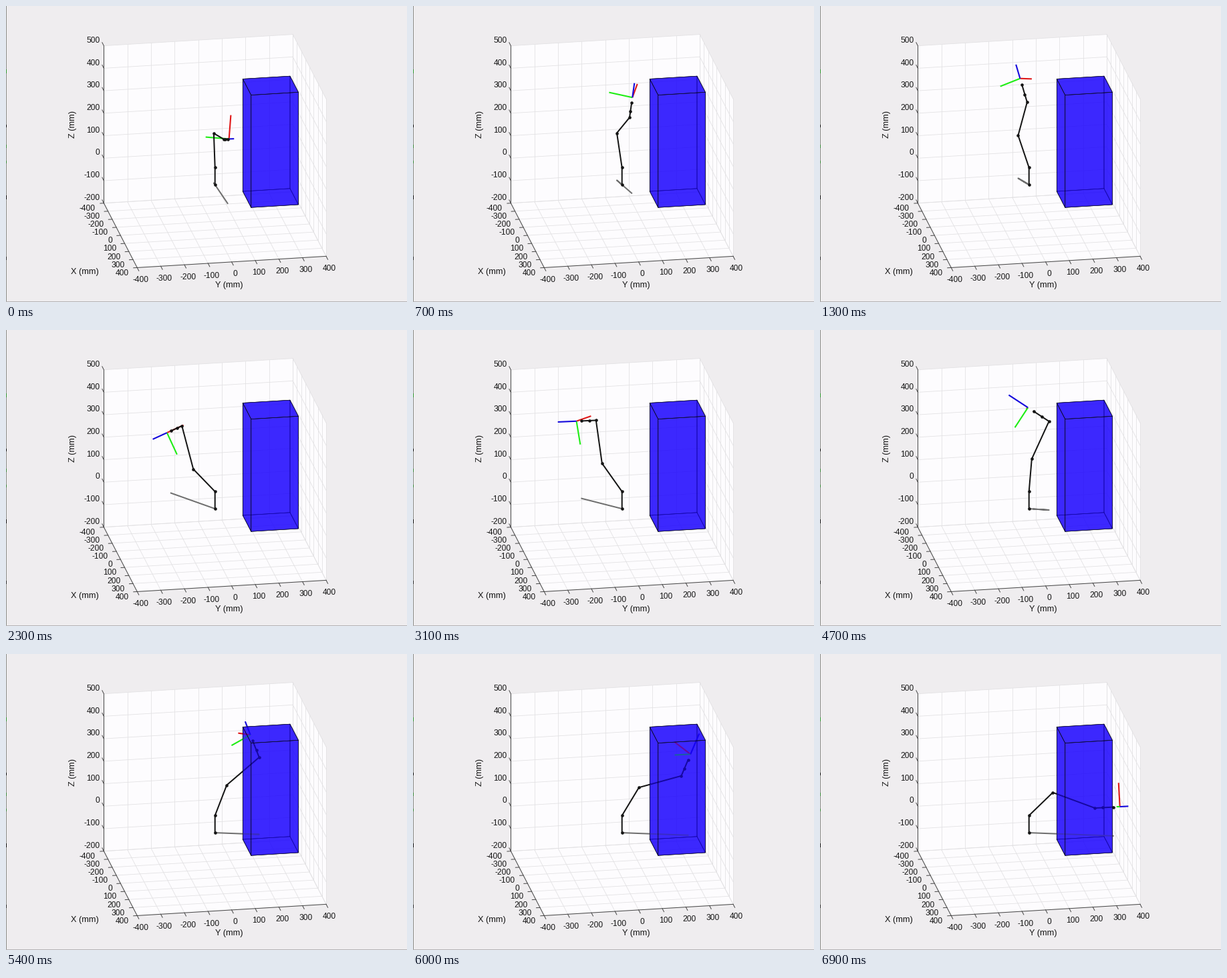
Animation, 600 px wide and 444 px high, one loop 7 s. Source, as a matplotlib script:

```python
import matplotlib.pyplot as plt
import numpy as np
from matplotlib.animation import FuncAnimation
from matplotlib.patches import Polygon, Rectangle

W, H, DPI = 600, 444, 100
FRAMES, INTERVAL = 70, 100
PX = 72 / DPI  # one pixel in points

LO = np.array([-400, -400, -200])
HI = np.array([400, 400, 500])

# orthographic view: azimuth 80, elevation 20 degrees
SCALE, ORIGIN = 0.3589, np.array([312.7, 268.1])
AZ, EL = np.radians([10, 20])
VIEW = SCALE * np.array([
    [np.sin(AZ), np.cos(AZ), 0],
    [np.cos(AZ) * np.sin(EL), -np.sin(AZ) * np.sin(EL), -np.cos(EL)],
])

# arm lengths in mm; the tool points lie along the hand
BASE, UPPER, FORE = 76.5, 146, 187.3
HAND = (34, 77)
TIP, AXIS = 105, 100

# joint angles in degrees: yaw, shoulder, elbow, wrist, roll
KEY_TIMES = [1, 23, 25.2, 49.7, 69]
KEY_POSES = np.array([
    [-177, 81.2, 86.8, -8, 171],
    [-146.2, 26.6, 41.9, -99.5, 85],
    [-146.2, 26.6, 41.9, -99.5, 85],
    [-106.3, 103, 15.5, -79, 121],
    [-106.3, 133.2, 66.2, -25, 160],
])

BACK, WALL, GRID = "#efedef", "#fdfcfe", "#e2e1e3"
INK, SHADOW, RULER, LABEL = "#141414", "#6e6e6e", "#484848", "#161616"
BOX_FACE, BOX_EDGE = (24 / 255, 0, 1, 0.6), "#08081e"
AXIS_COLORS = ("#e01818", "#1eee14", "#1408dc")

plt.rcParams["font.family"] = "Liberation Sans"
fig = plt.figure(figsize=(W / DPI, H / DPI), dpi=DPI, facecolor=BACK)
ax = fig.add_axes([0, 0, 1, 1])
ax.set_xlim(0, W)
ax.set_ylim(H, 0)
ax.axis("off")


def project(points):
    return np.atleast_2d(points) @ VIEW.T + ORIGIN


def line(points, color, width, z, **style):
    x, y = project(points).T
    return ax.plot(x, y, color=color, lw=width * PX, zorder=z, **style)[0]


def text(x, y, label, size=12, **style):
    ax.text(x, y, label, size=size * PX, color=LABEL, zorder=3, **style)


def quad(axis, value, lo, hi):
    """Corners of a rectangle lying across one axis."""
    a, b = [i for i in range(3) if i != axis]
    corners = np.full((4, 3), float(value))
    corners[:, a] = lo[a], hi[a], hi[a], lo[a]
    corners[:, b] = lo[b], lo[b], hi[b], hi[b]
    return corners


def draw_walls():
    for axis, value in ((0, LO[0]), (1, HI[1]), (2, LO[2])):
        ax.add_patch(Polygon(project(quad(axis, value, LO, HI)), fc=WALL, ec="none", zorder=0))
        a, b = [i for i in range(3) if i != axis]
        for along, across in ((a, b), (b, a)):
            for v in range(LO[across], HI[across] + 1, 100):
                ends = np.full((2, 3), float(value))
                ends[:, across] = v
                ends[:, along] = LO[along], HI[along]
                line(ends, GRID, 0.8, 1)


def draw_ruler(axis, start, tick_dir, offset, align):
    ends = np.array([start, start], float)
    ends[:, axis] = LO[axis], HI[axis]
    line(ends, RULER, 1, 2)
    tick = VIEW @ np.array(tick_dir)
    tick = 5.5 * tick / np.hypot(*tick)
    for v in range(LO[axis], HI[axis] + 1, 100):
        ends[0, axis] = v
        x, y = project(ends[0])[0]
        ax.plot([x, x + tick[0]], [y, y + tick[1]], color=RULER, lw=PX, zorder=2)
        text(x + offset[0], y + offset[1], str(v), ha=align, va="center_baseline")


def draw_box():
    lo, hi = np.array([100, 100, 0]), np.array([300, 300, 500])
    hidden = ((0, lo[0]), (1, hi[1]), (2, lo[2]))
    visible = ((0, hi[0]), (1, lo[1]), (2, hi[2]))
    for faces, z in ((hidden, 4), (visible, 8)):
        for axis, value in faces:
            outline = quad(axis, value, lo, hi)
            ax.add_patch(Polygon(project(outline), fc=BOX_FACE, ec="none", zorder=z))
            line(np.vstack([outline, outline[:1]]), BOX_EDGE, 0.65, z + 0.5)


def draw_screen_edge():
    ax.add_patch(Rectangle((0, 0), 1, H, fc="#8c8c88", ec="none", zorder=3))
    for y, h, color in ((95, 6, "#2f9a2f"), (178, 4, "#101010"), (208, 5, "#3c8c3c"),
                        (232, 4, "#3c8c3c"), (284, 6, "#101010"), (376, 5, "#303030")):
        ax.add_patch(Rectangle((0, y), 1, h, fc=color, ec="none", zorder=3))
    ax.add_patch(Rectangle((0, H - 1), W, 1, fc="#b4b2b4", ec="none", zorder=3))


draw_walls()
draw_ruler(2, (-400, -400, 0), (-1, 0, 0), (-6, -9.3), "right")
draw_ruler(0, (0, -400, -200), (0, -1, 0), (-12.4, 6.8), "right")
draw_ruler(1, (400, 0, -200), (1, 0, 0), (5.2, 17), "center")
text(100.5, 177.3, "Z (mm)", 12.7, rotation=90, ha="center", va="center")
text(117.5, 398.8, "X (mm)", 12.7, ha="center", va="center")
text(333.5, 418.8, "Y (mm)", 12.7, ha="center", va="center")
draw_box()
draw_screen_edge()

start = np.zeros((1, 3))
shadow = line(start, SHADOW, 2, 5)
tool_axes = [line(start, c, 2.1, 6, solid_capstyle="butt") for c in AXIS_COLORS]
arm = line(start, INK, 2, 7, marker="o", ms=4.6 * PX, mew=0)


def pose(frame):
    """Arm points, tool origin and tool directions at a frame."""
    yaw, shoulder, elbow, wrist, roll = np.radians(
        [np.interp(frame, KEY_TIMES, joint) for joint in KEY_POSES.T])
    out = np.array([np.cos(yaw), np.sin(yaw), 0])
    side = np.array([np.sin(yaw), -np.cos(yaw), 0])
    up = np.array([0, 0, 1])

    def heading(angle):
        return np.cos(angle) * out + np.sin(angle) * up

    fore, pitch = shoulder + elbow, shoulder + elbow + wrist
    points = [np.zeros(3), BASE * up]
    points.append(points[-1] + UPPER * heading(shoulder))
    points.append(points[-1] + FORE * heading(fore))
    joint, ahead, normal = points[-1], heading(pitch), heading(pitch + np.pi / 2)
    points += [joint + d * ahead for d in HAND]
    red = np.cos(roll) * normal + np.sin(roll) * side
    green = np.cos(roll) * side - np.sin(roll) * normal
    return np.array(points), joint + TIP * ahead, (red, green, ahead)


def clipped_end(origin, step):
    """End of a step from origin, cut at the limits of the plot."""
    room = np.where(step > 0, HI - origin, origin - LO)
    reach = np.min(room / np.maximum(np.abs(step), 1e-9))
    return origin + np.clip(reach, 0, 1) * step


def draw(frame):
    points, origin, directions = pose(frame)
    arm.set_data(*project(points).T)
    shadow.set_data(*project(points * [1, 1, 0]).T)
    for artist, direction in zip(tool_axes, directions):
        end = clipped_end(origin, AXIS * direction)
        artist.set_data(*project([origin, end]).T)
    return [arm, shadow, *tool_axes]


anim = FuncAnimation(fig, draw, frames=FRAMES, interval=INTERVAL, repeat=True)
plt.show()
```
